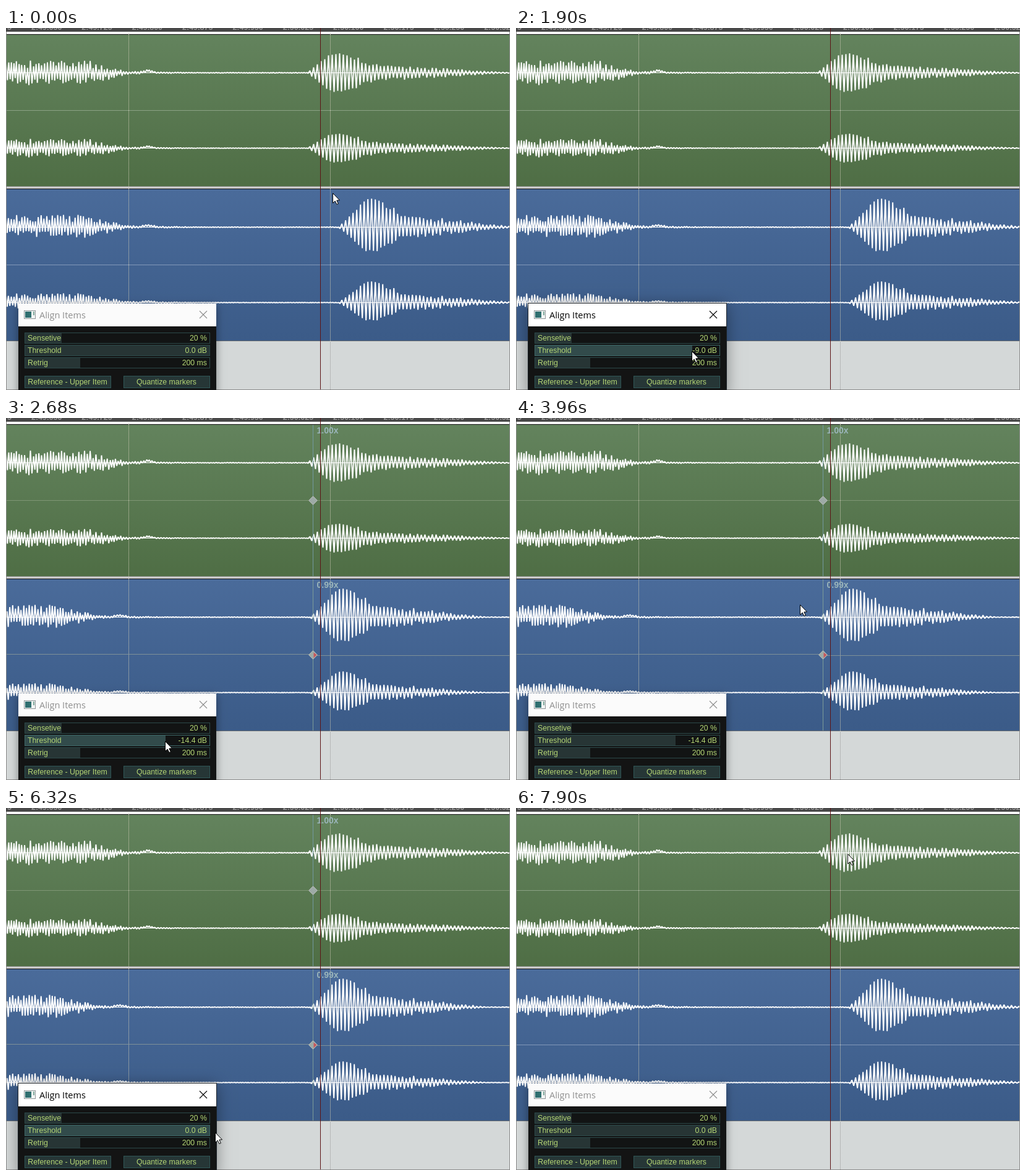
These frames come from a looping animation (815x586 px, 8 s). An HTML page with a canvas:

```html
<!DOCTYPE html>
<html lang="en">
<head>
<meta charset="utf-8">
<title>Align Items</title>
<style>
html, body { margin: 0; width: 815px; height: 586px; overflow: hidden; background: #d4d8d8; }
canvas { display: block; }
</style>
</head>
<body>
<canvas id="stage" width="815" height="586"></canvas>
<script>
const ctx = document.getElementById('stage').getContext('2d');
const LOOP = 8000;
const TICK = 262; // the screen refreshes about four times a second
const SHIFT = -46; // how far aligning moves the lower item
const SANS = '"Liberation Sans", Arial, sans-serif';
const TITLE = '14.5px "Open Sans", "Noto Sans", sans-serif';
const INK = '#b4d574';

// pointer key points: tick, x, y
const PATH = [
  [0, 528, 267], [1, 551, 393], [2, 572, 470], [5, 337, 525], [6, 337, 525],
  [7, 284, 523], [9, 257, 523], [12, 257, 523], [13, 347, 412], [14, 405, 464],
  [16, 513, 140], [17, 496, 45], [18, 486, 320], [19, 400, 500], [20, 310, 522],
  [21, 257, 523], [22, 257, 523], [23, 285, 523], [24, 338, 525], [26, 338, 525],
  [28, 566, 487], [30, 536, 74]
];

const GREEN = { start: 488, attack: 36, body: 17, hit: 18, hitEnd: 115, tail: 13, tailEnd: 325, down: 1 };
const BLUE = { start: 538, attack: 46, body: 17, hit: 30, hitEnd: 112, tail: 19, tailEnd: 285, down: .84 };

const between = (v, a, b) => v >= a && v <= b;
const ramp = (v, a, b) => Math.min(1, Math.max(0, (v - a) / (b - a)));
const fade = (v, a, b) => 1 - ramp(v, a, b);

function random(seed) {
  return () => (seed = seed * 16807 % 2147483647) / 2147483647;
}

function pointerAt(tick) {
  const i = Math.max(1, PATH.findIndex(p => p[0] >= tick));
  const a = PATH[i - 1], b = PATH[i], k = ramp(tick, a[0], b[0]);
  return [1, 2].map(j => Math.round(a[j] + (b[j] - a[j]) * k));
}

function loudness(sound, x) {
  const d = x - sound.start;
  const before = sound.body * fade(x, 135, 195) + 2.5 * fade(x, 200, 300);
  const after = ramp(d, 0, sound.attack) *
    (sound.hit * fade(d, 60, sound.hitEnd) + sound.tail * fade(d, 130, sound.tailEnd));
  return .6 + before + after;
}

// a zigzag under the loudness curve: ragged speech first, then a ringing tone
function zigzag(sound, gain) {
  const rnd = random(sound.start * 77), points = [];
  let side = -1;
  for (let x = 0; x < 866; side = -side) {
    const d = x - sound.start;
    const rough = d < 0 ? .65 : .12 + .4 * ramp(d, 60, 120);
    const size = loudness(sound, x) * (1 - rough * rnd()) * gain;
    const bump = 3 * gain * Math.exp(-(((x - 230) / 10) ** 2));
    points.push([x, side * size * (side > 0 ? sound.down : 1) - bump]);
    x += d < 0 ? 1.9 + rnd() * .7 : 3;
  }
  return points;
}

const waves = [
  { y: 72.5, points: zigzag(GREEN, 1), shift: 0 },
  { y: 194.5, points: zigzag(GREEN, .75), shift: 0 },
  { y: 322.5, points: zigzag(BLUE, 1), shift: SHIFT },
  { y: 444.5, points: zigzag(BLUE, .74), shift: SHIFT }
];

function box(x, y, w, h, color) {
  ctx.fillStyle = color;
  ctx.fillRect(x, y, w, h);
}

function framed(x, y, w, h, color, edge) {
  box(x, y, w, h, edge);
  box(x + 1, y + 1, w - 2, h - 2, color);
}

function text(s, x, y, font, color, align = 'left') {
  ctx.font = font;
  ctx.fillStyle = color;
  ctx.textAlign = align;
  ctx.fillText(s, x, y);
}

function shape(points, fill, stroke, width = 1) {
  ctx.beginPath();
  points.forEach(([x, y]) => ctx.lineTo(x, y));
  if (fill) {
    ctx.closePath();
    ctx.fillStyle = fill;
    ctx.fill();
  }
  if (stroke) {
    ctx.strokeStyle = stroke;
    ctx.lineWidth = width;
    ctx.stroke();
  }
}

function item(y, top, bottom) {
  const g = ctx.createLinearGradient(0, y, 0, y + 245);
  g.addColorStop(0, top);
  g.addColorStop(1, bottom);
  box(1, y - 1, 813, 1, '#141414');
  box(1, y, 813, 245, g);
}

function gridLine(x) {
  for (let y = 8; y < 585; y += 2) box(x, y, 1, 1, y > 506 ? '#999' : '#cdcab4');
}

function ruler() {
  box(0, 0, 815, 6, '#484848');
  box(0, 6, 815, 4, '#f6f6f6');
  for (let i = -1; i < 10; i++) {
    const seconds = 49.65 + i * .075;
    text('2:' + seconds.toFixed(3), 41 + i * 81.35, 3, 'bold 12.5px ' + SANS, '#969696');
  }
}

function marker(y, label, line, redHalf) {
  const x = 496.5, mid = y + 122.5;
  box(496, y, 1, 245, line);
  shape([[x, mid - 7], [x + 7, mid], [x, mid + 7], [x - 7, mid]], '#9daaa6', '#b4b9b4');
  if (redHalf) shape([[x + 1, mid - 4], [x + 6, mid], [x + 1, mid + 5]], '#c9575c');
  text(label, 502.5, y + 14, 'bold 14px ' + SANS, '#9ab5ba');
}

function tracks(aligned) {
  box(0, 0, 815, 586, '#d4d8d8');
  ruler();
  box(0, 256, 815, 4, '#cbcbcb');
  box(0, 256, 815, 1, '#8d918b');
  item(11, '#63835d', '#4f6e45');
  item(261, '#4a6b9a', '#3b5b88');
  box(1, 506, 813, 1, '#666b70');

  box(1, 133, 813, 1, aligned ? '#7f9674' : '#8ba285');
  const bend = aligned ? 1 : 0;
  box(1, 383 - bend, 495, 1, aligned ? '#7e9098' : '#8298b8');
  box(496, 383 + bend, 318, 1, aligned ? '#7e9098' : '#8298b8');
  gridLine(198);
  gridLine(524);

  ctx.lineJoin = 'bevel';
  for (const { y, points, shift } of waves) {
    box(1, y - .5, 813, 1, '#fff');
    ctx.save();
    ctx.translate(aligned ? shift : 0, y);
    shape(points, null, '#fff', 1.9);
    ctx.restore();
  }
  ctx.lineJoin = 'miter';

  if (aligned) {
    marker(11, '1.00x', '#7399a0', false);
    marker(261, '0.99x', '#7d9c98', true);
  }
  box(508, 0, 1, 585, '#5c1416');
  box(0, 6, 1, 580, '#8c8c8c');
  box(814, 6, 1, 580, '#8c8c8c');
  box(0, 585, 815, 1, '#8c8c8c');
}

function slider(y, label, value, part, hot) {
  framed(30, y, 300, 18, '#121414', hot ? '#3d6868' : '#2c4a4a');
  box(31, y + 1, Math.min(298, 300 * part - 1), 16, hot ? '#324b4b' : '#273535');
  text(label, 35, y + 13, '12.3px ' + SANS, INK);
  text(value, 325, y + 13, '12.3px ' + SANS, INK, 'right');
}

function button(x, label) {
  framed(x, 563, 140, 20, '#263636', '#2f5656');
  text(label, x + 69.5, 577, '12.3px ' + SANS, INK, 'center');
}

function dialog(active, part, hot) {
  ctx.save();
  ctx.shadowColor = 'rgba(0,0,0,.4)';
  ctx.shadowBlur = active ? 24 : 13;
  ctx.shadowOffsetY = 3;
  box(20, 446, 320, 150, '#131414');
  ctx.restore();
  if (active) box(19, 445, 322, 141, '#1c2228');
  box(20, 446, 320, 37, active ? '#fff' : '#fbfbfb');
  box(20, 483, 320, 103, '#131414');

  const ink = active ? '#000' : '#8e8e8e';
  framed(29, 457, 19, 14, '#f3f5f5', '#8f9698');
  box(31, 459, 10, 10, '#2f6f70');
  box(44, 459, 2, 6, '#7fa89a');
  text('Align Items', 54, 470, TITLE, ink);
  shape([[313, 458], [325, 470]], null, ink, 1.1);
  shape([[325, 458], [313, 470]], null, ink, 1.1);

  slider(493, 'Sensetive', '20 %', .2);
  slider(513, 'Threshold', (60 * part - 60).toFixed(1) + ' dB', part, hot);
  slider(533, 'Retrig', '200 ms', .3);
  button(30, 'Reference - Upper Item');
  button(190, 'Quantize markers');
}

function arrow(x, y) {
  const outline = [[0, 0], [0, 16], [3.7, 12.6], [6.4, 18], [8.9, 17], [6.3, 11.6], [11, 11.3]];
  shape(outline.map(([px, py]) => [x + .5 + px, y + .5 + py]), '#fff', '#000');
}

function beam(x, y) {
  for (const [top, serif, color] of [[0, 0, '#c39a66'], [6, 15, '#222']]) {
    box(x, y + serif, 3, 1, color);
    box(x + 4, y + serif, 3, 1, color);
    box(x + 3, y + top + 1, 1, top ? 8 : 6, color);
  }
}

function draw(tick) {
  const [x, y] = pointerAt(tick);
  // the threshold follows the pointer except between the two drags
  const [grip] = pointerAt(between(tick, 10, 21) ? 9 : tick);
  const active = between(tick, 7, 9) || between(tick, 22, 25);
  const hot = between(tick, 5, 10) || between(tick, 20, 26);
  tracks(between(tick, 10, 25));
  dialog(active, ramp(grip + 1, 30, 330), hot);
  (tick === 19 ? beam : arrow)(x, y);
}

let shown = -1;
function frame(now) {
  const tick = Math.floor(now % LOOP / TICK);
  if (tick !== shown) draw(shown = tick);
  requestAnimationFrame(frame);
}
frame(performance.now());
</script>
</body>
</html>
```
